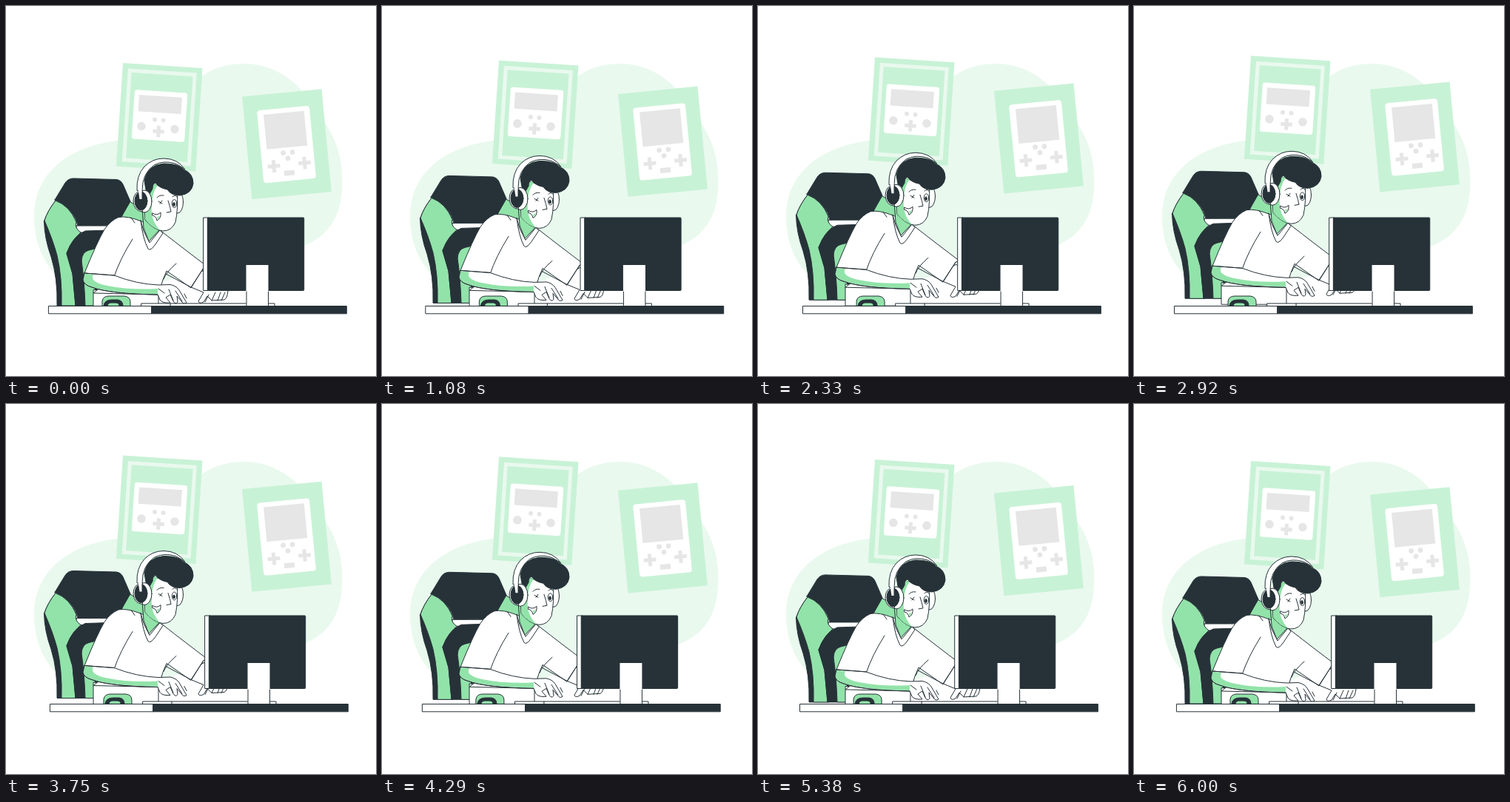
Write an HTML page that moves like this. It is 500 px wide and 500 px high and loops after 6040 ms.

```html
<!DOCTYPE html>
<html lang="en">
<head>
<meta charset="utf-8">
<title>Gamer at a desk</title>
<style>
  html, body { margin: 0; width: 100%; height: 100%; overflow: hidden; background: #fff; }
  svg { display: block; width: 100%; height: 100%; }
  .dark { fill: #263238; }
  .green { fill: #92e3a9; }
  .mint { fill: #c8f2d6; }
  .pale { fill: #e9f9ee; }
  .grey { fill: #e6e6e6; }
  .white { fill: #fff; }
  .ink { stroke: #263238; stroke-linecap: round; stroke-linejoin: round; }
  .line { fill: none; }
</style>
</head>
<body>
<svg viewBox="0 0 500 500">
  <path class="pale" d="M38 284C38 246 58 214 100 195C137 179 176 183 208 164C235 147 240 116 262 97C281 82 302 78 322 78C361 78 394 100 416 136C429 153 443 174 449 196C455 216 456 242 452 264C446 296 427 314 403 324C362 339 318 338 278 350C232 364 190 386 145 387C112 388 86 383 68 364C47 342 38 314 38 284Z"/>

  <g class="float">
    <g transform="translate(158 77) rotate(3.75)">
      <path class="mint" d="M0 0H107.7V139.8H0Z"/>
      <path class="line" d="M10 9.5H98V130.5H10Z" stroke="#e9f9ee" stroke-width="5"/>
      <rect class="white" x="18.3" y="34.9" width="71.6" height="66.5" rx="3.5"/>
      <g class="grey">
        <path d="M24.8 41.5h58v22.2h-58zM51.5 81.5h5v5.2h5.2v5h-5.2v5.2h-5v-5.2h-5.2v-5h5.2z"/>
        <circle cx="30.5" cy="83.7" r="5.8"/><circle cx="75.7" cy="84.7" r="5.8"/>
        <circle cx="47.9" cy="73.5" r="3"/><circle cx="59.5" cy="73.8" r="3"/>
      </g>
    </g>
    <g transform="translate(319 122.5) rotate(-5.5)">
      <path class="mint" d="M0 0H108V139.5H0Z"/>
      <rect class="white" x="18.1" y="20.8" width="71" height="98.5" rx="4"/>
      <g class="grey">
        <path d="M26.5 27.2h55v47h-55zM46.8 105.2h14v7h-14z"/>
        <path d="M31.3 89.3h5v5.9h5.9v5h-5.9v5.9h-5v-5.9h-5.9v-5h5.9z"/>
        <path d="M73 88.8h5v5.9h5.9v5H78v5.9h-5v-5.9h-5.9v-5H73z"/>
        <circle cx="48" cy="81" r="3.4"/><circle cx="60.5" cy="81.2" r="3.4"/><circle cx="53.7" cy="89" r="3.4"/>
      </g>
    </g>
  </g>

  <!-- chair -->
  <g class="float ink">
    <path class="green" d="M150 296L167 264L186 276L187 296Z"/>
    <path class="dark" d="M66 262L80 239Q84 233 91 233L149 234.500Q155 235 158 241L168 264Q158 281 150 296L97 297Q94 277 66 262Z"/>
    <path class="white" d="M95 297H152L146 306H100Q94 305 95 297Z"/>
    <path class="dark" d="M51.500 291Q56 277 67 263L80 320L96 405H69Q70 368 61 339Q52 314 51.500 291Z"/>
    <path class="green" d="M52 290Q56 277 67 263Q86 270 95 292Q92 300 101 306Q89 317 82 334L90 362L94 405H75Q76 367 69 337Q63 315 52 290Z"/>
    <path class="dark" d="M82 334Q90 311 107 304L140 303L120 405H94L90 362Z"/>
    <path class="green" d="M102 344Q103 332 112 330L124 327L119 405H107Q106 372 102 344Z"/>
  </g>

  <!-- player -->
  <g class="float ink">
    <path class="white" d="M118 384V413H206V386Z"/>
    <path class="white" d="M248 366L268 357L282 372L300 385Q299 395 295 397L278 398L272 392L267 400Q261 403 260 399L267 387L250 380Z"/>
    <path class="line" d="M274 390L269 400M283 387L278 398M290 387L286 398M296 387L291 398"/>
    <path class="white" d="M183 291Q163 283 152 285.500Q141 290 133 302Q123 319 106 361L146 366L118 388L206 390L212 370L217 358L250 381L267 354L272 352Q244 331 212 306Z"/>
    <path class="line" d="M171 315Q154 342 146 366M213 369Q216 360 230 348M267 354L250 380L216 362M169 286L174 293"/>

    <path class="white" d="M106 361L146 364Q177 376 206 377L222 376.500Q230 378 234 384L244 401Q240 404 237 399L231 392L232 400Q229 404 226 399L222 390L216 394L222 401Q211 402 208 397L205 390Q140 389 116 380Q105 377 104 370Z"/>
    <path class="green" stroke="none" d="M106 361.500L118 363Q112 373 137 378Q167 384 205 382V389.500Q140 388 116 379.500Q105 376 104.500 370Z"/>
    <path class="line" d="M106 361L146 364M205 390Q140 389 116 380Q105 377 104 370L106 361M206 382L214 388M220 383L226 398M229 385L238 399M241 389L244 395"/>

    <path class="green" d="M184 272L186 300L193 318L207 303V280Z"/>
    <path class="white" d="M182 290L186 304L194 320L208 303L212 307L202 322Q195 332 192 328Q185 315 182 290Z"/>
    <ellipse class="white" cx="232" cy="265" rx="7.500" ry="15"/>
    <path class="white" d="M196 240L231 250Q233 273 229 292Q224 304 212 304Q200 303 188 289L187 262Z"/>
    <path class="green" stroke="none" d="M196 240L205 242Q197 252 197 271Q195 289 208 303Q197 300 188.500 289L187.500 262Z"/>
    <path class="dark" d="M190 254L187 236Q191 215 213 213Q234 213 240 221Q253 226 253 240Q251 254 235 256Q223 256 218 248Q207 246 202 239Q198 240 198 247L194 254Z"/>
    <path class="white" d="M177 249Q176 229 187 217Q198 206 213 206Q232 206 242 221Q236 216 229 213Q213 208 200 215Q184 226 184 249Z"/>
    <ellipse class="white" cx="187" cy="264" rx="10" ry="15"/>
    <path class="white" d="M184 249Q172 251 172 264Q173 277 184 278Z"/>
    <ellipse class="dark" cx="182.500" cy="263.500" rx="8.500" ry="12.500"/>
    <path class="white" stroke="none" d="M178.500 247H183.500V261H180.500Z"/>

    <path class="line" d="M204 259Q207 255 213 256M206 264L211 267M211 263L208 267M219 263Q222 272 223 278L217 279M225 258Q228 254 231 258"/>
    <ellipse class="white" cx="227.500" cy="267" rx="3.200" ry="5.500"/>
    <ellipse class="dark" cx="227" cy="268" rx="1.300" ry="2.500"/>
    <path class="white" d="M198 280Q204 284 209 279Q210 287 204 290Q203 284 198 283Z"/>
    <path class="green" stroke="none" d="M204 285L208 284L205 289Z"/>
  </g>

  <!-- desk, screen, keyboard, mouse -->
  <g class="shake ink">
    <path class="white" d="M183 402H363V405.500H183ZM222 402V405"/>
    <path class="green" d="M130 405V399Q131 392 139 392H160Q168 393 168 400V405Z"/>
    <path class="dark" d="M132 405Q133 397 143 397H151Q158 398 158 405H153Q153 401 148 401H142Q138 401 137 405Z"/>
    <path class="white" d="M267 286H273V384.500H267Z"/>
    <rect class="dark" x="272.300" y="286" width="130.400" height="98.500" rx="1"/>
    <path class="white" stroke="none" d="M324.500 350H354.500V405H324.500Z"/>
    <path class="line" d="M325 386V405M354.500 386V405"/>
    <path class="white" d="M57.800 405.500H197V415.800H57.800Z"/>
    <path class="dark" d="M197 405.500H460.300V415.800H197Z"/>
  </g>
</svg>
<script>
const CYCLE = 6000, HOLD = 40, RISE = 10;
const shakeX = [0, -1, 2, -4, 4, -4, 4, -4, 2, -1, 0];
const floats = document.querySelectorAll('.float');
const desk = document.querySelector('.shake');

function sample(keys, p) {
  const i = Math.min(Math.floor(p * (keys.length - 1)), keys.length - 2);
  return keys[i] + (keys[i + 1] - keys[i]) * (p * (keys.length - 1) - i);
}

function draw() {
  const p = Math.min(performance.now() % (CYCLE + HOLD), CYCLE) / CYCLE;
  const y = sample([0, -RISE, 0], p);
  floats.forEach(el => el.setAttribute('transform', `translate(0 ${y})`));
  desk.setAttribute('transform', `translate(${sample(shakeX, p)} 0)`);
  requestAnimationFrame(draw);
}
draw();
</script>
</body>
</html>
```
